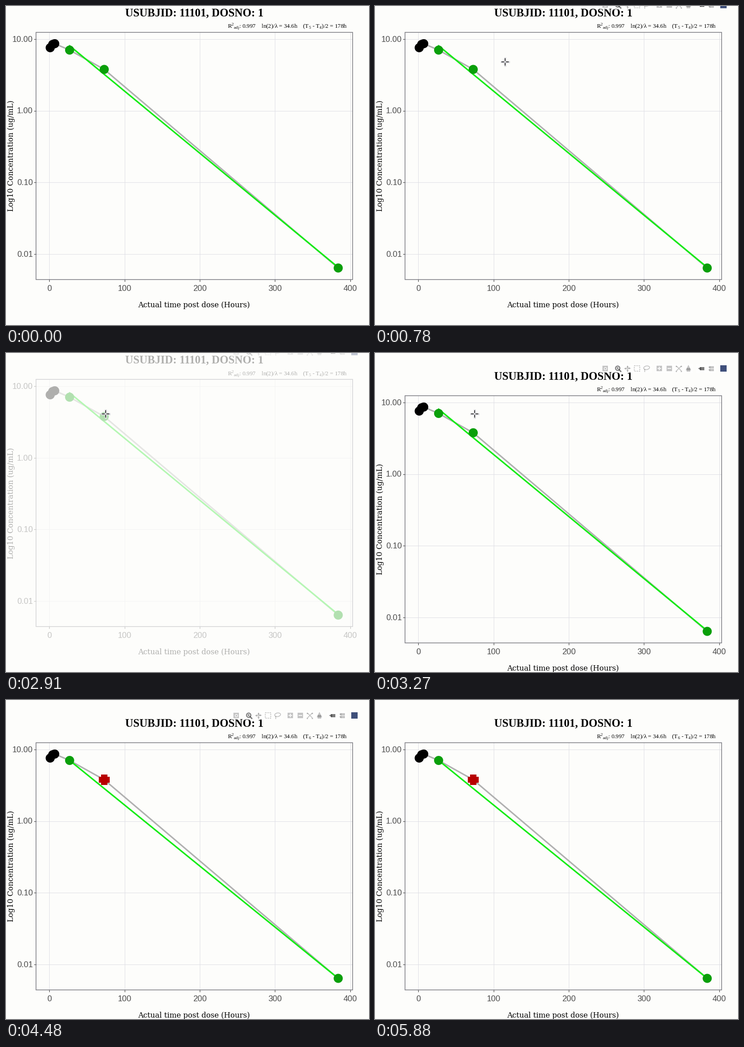
These frames come from a looping animation (798 px wide and 702 px high, 7150 ms). A matplotlib script:

```python
import numpy as np
import matplotlib.pyplot as plt
from matplotlib.animation import FuncAnimation
from matplotlib.patches import Circle, Ellipse, Rectangle

W, H, DPI = 798, 702, 96
PX = 72 / DPI                # points per pixel
STEP, LOOP = 50, 7150        # ms
SCROLL = 36

BG, INK = "#fdfdfb", "#444444"
LIME, GREEN, RED = "#14ec14", "#0a9f0a", "#b80000"
SANS, SERIF, SLAB = "Liberation Sans", "Liberation Serif", "DejaVu Serif"

plt.rcParams["mathtext.fontset"] = "custom"
plt.rcParams["mathtext.rm"] = SERIF

fig = plt.figure(figsize=(W / DPI, H / DPI), dpi=DPI, facecolor=BG)
ax = fig.add_axes([0, 0, 1, 1])
ax.set_xlim(0, W)
ax.set_ylim(H, 0)
ax.axis("off")


def line(xs, ys, color, width=1, z=2, **kw):
    return ax.plot(xs, ys, color=color, lw=width * PX, zorder=z, **kw)[0]


def text(x, y, s, size, family, color="black", z=4, **kw):
    return ax.text(x, y, s, fontsize=size * PX, family=family, color=color,
                   va="baseline", zorder=z, **kw)


def shape(patch, z):
    patch.set_zorder(z)
    return ax.add_patch(patch)


def box(x, y, w, h, color, z):
    return shape(Rectangle((x, y), w, h, fc=color, lw=0), z)


def outline(patch_type, *args, color=INK, width=1.8, z=9, **kw):
    return shape(patch_type(*args, fill=False, ec=color, lw=width * PX, **kw), z)


def ramp(t, start, end):
    u = np.clip((t - start) / (end - start), 0, 1)
    return u * u * (3 - 2 * u)


# Plot scales, in pixels
def x_of(hours):
    return 95.2 + 1.654 * np.asarray(hours)


def y_of(conc):
    return 73 + 157.5 * (1 - np.log10(conc))


LEFT, RIGHT, TOP, BOTTOM = 66, 762, 58, 601.5
TICK = 4.5

for hours in range(0, 500, 100):
    x = x_of(hours)
    line([x, x], [TOP, BOTTOM], "#dedee4", 1, 1)
    line([x, x], [BOTTOM, BOTTOM + TICK], INK, 1.2)
    text(x, 627, hours, 18, SANS, "#4d4d4d", ha="center")
for power in range(1, -3, -1):
    y = y_of(10.0 ** power)
    line([LEFT, RIGHT], [y, y], "#dedee4", 1, 1)
    line([LEFT - TICK, LEFT], [y, y], INK, 1.2)
    text(59, y + 6, f"{10.0 ** power:.2f}", 18, SANS, "#4d4d4d", ha="right")
outline(Rectangle, (LEFT, TOP), RIGHT - LEFT, BOTTOM - TOP,
        color="#77777f", width=1.5, z=2)

text(413.5, 22, "USUBJID: 11101, DOSNO: 1", 24.5, SERIF, weight="bold",
     ha="center")
text(413.5, 663, "Actual time post dose (Hours)", 16.2, SLAB, ha="center")
text(16.5, 330, "Log10 Concentration (ug/mL)", 16.2, SLAB, ha="center",
     rotation=90, rotation_mode="anchor")


def stats(last):
    gap = " " * 4
    return gap.join([r"R$^\mathrm{2}{}_\mathrm{adj}$: 0.997",
                     "ln(2)/λ = 34.6h",
                     rf"(T$_\mathrm{{{last}}}$ - T$_\mathrm{{4}}$)/2 = 178h"])


notes = [text(750, 50, stats(k), 13, SERIF, ha="right") for k in (5, 6)]

# Measured profile; the last three points feed the fit
hours = np.array([1.2, 4.5, 7.2, 27, 73, 384])
conc = np.array([7.6, 8.45, 8.65, 7.04, 3.78, 0.00635])
xs, ys = x_of(hours), y_of(conc)
line(xs, ys, "#b0b0b0", 3.2, 3)
dots = [shape(Circle(p, 10, fc="black" if k < 3 else GREEN, lw=0), 5)
        for k, p in enumerate(zip(xs, ys))]


def fit_line(used):
    trend = np.poly1d(np.polyfit(xs[used], ys[used], 1))
    ends = xs[[3, 5]]
    return line(ends, trend(ends), LIME, 3.3, 3.5)


fits = [fit_line([3, 4, 5]), fit_line([3, 5])]
cross = [box(xs[4] - w / 2, ys[4] - h / 2, w, h, RED, 5)
         for w, h in ((23.5, 13.5), (13.5, 23.5))]
before = [notes[0], fits[0], dots[4]]
after = [notes[1], fits[1], *cross]

# Hover label
tip = [box(228, 113, 99.5, 53.5, "#009600", 6),
       text(231, 135, "Data Point: 5", 17.6, SERIF, "white", 7),
       text(231, 158, "(73 , 3.8)", 17.6, SERIF, "white", 7)]

# Toolbar: parts are kept with their own opacity and fade together
bar = []
CY = -2
PITCH, GAP = 21.1, 28.3


def part(artist, alpha=0.3):
    bar.append((artist, alpha))


def mark(x, marker, size, alpha=0.3, dy=0, color=INK, edge=0, fill=True):
    part(line([x], [CY + dy], color, z=9, marker=marker,
              markersize=size * PX, markeredgewidth=edge * PX,
              markerfacecolor=color if fill else "none"), alpha)


def camera(x):
    mark(x, "s", 12)
    mark(x, "o", 7, 0.9, color="white")
    mark(x, "o", 4)


def zoom(x):
    mark(x - 1, "o", 9.5, 0.7, -1, edge=2.2, fill=False)
    mark(x - 1, "+", 5, 0.7, -1, edge=1.5)
    part(line([x + 2.5, x + 6.5], [CY + 2.5, CY + 6.5], INK, 2.8, 9), 0.7)


def pan(x):
    mark(x, "+", 10, edge=1.8)
    for side in (-1, 1):
        mark(x, "v" if side > 0 else "^", 5, dy=5.5 * side)
        mark(x + 5.5 * side, ">" if side > 0 else "<", 5)


def select(x):
    part(outline(Rectangle, (x - 6, CY - 6), 12, 12, ls=(0, (1.6, 1))))


def lasso(x):
    part(outline(Ellipse, (x, CY - 1.5), 13, 8, angle=-10))
    part(line([x - 4, x - 4], [CY + 2, CY + 6.5], INK, 1.8, 9))


def zoom_step(sign):
    def draw(x):
        mark(x, "s", 12)
        mark(x, sign, 8, 0.9, color="white", edge=2)
    return draw


def autoscale(x):
    mark(x, "x", 10, edge=1.8)
    for dx in (-5.5, 5.5):
        for dy in (-5.5, 5.5):
            mark(x + dx, "s", 3, dy=dy)


def home(x):
    mark(x, "^", 12, dy=-2, edge=0)
    mark(x, "s", 8, dy=3)


def tags(alpha, height, *rows):
    def draw(x):
        for dy in rows:
            mark(x - 4.5, "<", height, alpha, dy)
            part(box(x - 3, CY + dy - height / 2, 10, height, INK, 9), alpha)
    return draw


def badge(x):
    mark(x, "s", 14, 1, color="#3f4f7a")


x = 505.5
for group in ([camera], [zoom, pan, select, lasso],
              [zoom_step("+"), zoom_step("_"), autoscale, home],
              [tags(0.7, 7, 0), tags(0.3, 5, -3, 3)], [badge]):
    width = PITCH * len(group)
    part(box(x - PITCH / 2, CY - 10, width, 20, "white", 8), 0.5)
    for k, icon in enumerate(group):
        icon(x + PITCH * k)
    x += width + GAP - PITCH

# Dimming while the plot recalculates
veil = box(-10, -60, W + 20, H + 120, BG, 20)

# Crosshair pointer: four arms around an open centre
ARMS = np.concatenate([[[2 * dx, 2 * dy], [8 * dx, 8 * dy], [np.nan] * 2]
                       for dx, dy in ((1, 0), (-1, 0), (0, 1), (0, -1))])
pointer = [line([], [], "#dcdce0", 4.5, 30),
           line([], [], "#111111", 1.5, 31, solid_capstyle="butt")]
ENTER, LEAVE = 30, 4470
START = np.array([806, 496])
GLIDES = [(-100, 720, (286, 123)), (760, 1270, (219, 134)),
          (3740, 4100, (242, 132)), (4130, LEAVE, (560, 715))]


def pointer_at(t):
    place, here = START.astype(float), START
    for begin, end, goal in GLIDES:
        place = place + (np.array(goal) - here) * ramp(t, begin, end)
        here = np.array(goal)
    return place


def show(artists, visible):
    for artist in artists:
        artist.set_visible(visible)


def update(i):
    t = i * STEP + STEP / 2

    shift = SCROLL * ramp(t, 2910, 3230)
    ax.set_ylim(H - shift, -shift)

    x, y = pointer_at(t)
    for arms in pointer:
        arms.set_data(x + ARMS[:, 0], y - shift + ARMS[:, 1])
    show(pointer, ENTER < t < LEAVE)

    shown = ramp(t, 100, 400) - ramp(t, 4480, 4850)
    for artist, alpha in bar:
        artist.set_alpha(alpha * shown)
        artist.set_visible(shown > 0)

    show(tip, 1180 < t < 2910)
    veil.set_alpha(0.7 * (ramp(t, 1630, 1890) - ramp(t, 2910, 3200)))

    excluded = t > 3500
    show(before, not excluded)
    show(after, excluded)
    return []


anim = FuncAnimation(fig, update, frames=LOOP // STEP, interval=STEP,
                     repeat=True, repeat_delay=0, blit=False)
plt.show()
```
